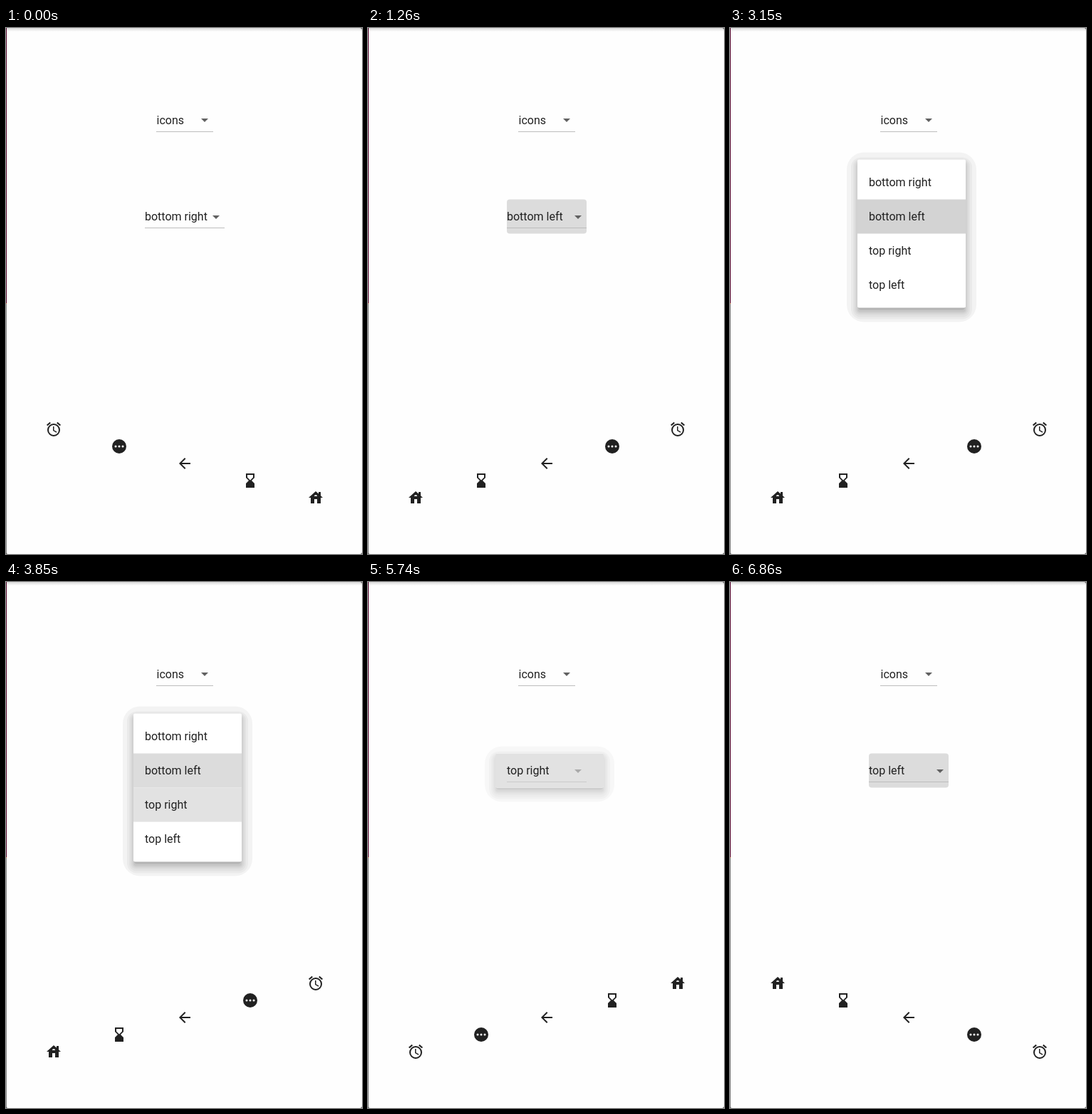
An HTML page for the animation above (8 s loop, 500 by 738 pixels).

```html
<!DOCTYPE html>
<html lang="en">
<head>
<meta charset="utf-8">
<title>Dropdown and icon layout</title>
<style>
  html, body { margin: 0; width: 100%; height: 100%; overflow: hidden; background: #fefefe; }
  svg { display: block; width: 500px; height: 738px; }
  text { font: 16px Roboto, sans-serif; fill: #212121; white-space: pre; }
</style>
</head>
<body>
<svg id="stage" viewBox="0 0 500 738">
  <defs>
    <linearGradient id="topShade" x2="0" y2="1">
      <stop stop-color="#d8d8d8"/><stop offset="1" stop-color="#fefefe"/>
    </linearGradient>
    <clipPath id="menuClip"><rect id="clipBox" x="179" width="152" rx="2"/></clipPath>
  </defs>
  <rect width="500" height="738" fill="#fefefe"/>
  <rect width="500" height="5" fill="url(#topShade)"/>
  <rect width="1" height="386" fill="#5a0a32"/>
  <rect y="386" width="1" height="1" fill="#e08040"/>
  <rect y="387" width="1" height="351" fill="#8a8a8a"/>
  <path d="M497 0h3v3q0-3-3-3zM500 735v3h-3q3 0 3-3zM0 735v3h3q-3 0-3-3z" fill="#555"/>

  <text x="211.5" y="135">icons</text>
  <path d="M274 127h10l-5 5z" fill="#616161"/>
  <rect x="211" y="145" width="80" height="1" fill="#bdbdbd"/>

  <rect id="focus" x="195" y="240.5" width="112" height="48" rx="4" fill="#dcdcdc"/>
  <text id="label" x="195" y="270"></text>
  <path d="M290 263h10l-5 5z" fill="#616161"/>
  <rect x="195" y="280" width="112" height="1" fill="#bdbdbd"/>

  <g id="icons" fill="#212121"></g>
  <g id="menu">
    <g id="shadow"></g>
    <rect id="panel" x="179" width="152" rx="2" fill="#fff"/>
    <g clip-path="url(#menuClip)"><g id="rows"></g></g>
  </g>
</svg>
<script>
const LOOP = 8000, STEP = 70;
const ROW = 48, PAD = 8, BUTTON_TOP = 240.5;
const OPEN_LEAD = 48;   // ms already elapsed when the menu first shows
const OPTIONS = ['bottom right', 'bottom left', 'top right', 'top left'];

// Each session selects the option after the current one.
const SESSIONS = [
  { open: 210, hover: 490, press: 1120, close: 1190 },
  { open: 2870, hover: 3290, press: 3850, close: 3920 },
  { open: 5740, hover: 6160, press: 6650, close: 6790 },
];

// Shadow bands: spread at the sides, top and bottom, corner radius, opacity
const BANDS = [
  [15, 10, 20, 24, .045], [9, 3, 16, 14, .04], [6, 1, 13, 10, .035],
  [4, -1, 10, 8, .035], [2, -3, 8, 6, .04], [0, -5, 6, 4, .05], [-1, -6, 3, 4, .09],
];

const ICONS = [
  'M22 5.72l-4.6-3.86-1.29 1.53 4.6 3.86zM7.88 3.39L6.6 1.86 2 5.71l1.29 1.53zM12.5 8H11v6l4.75 2.85.75-1.23-4-2.37zM12 4a9 9 0 1 0 0 18a9 9 0 0 0 0-18zm0 16a7 7 0 1 1 0-14a7 7 0 0 1 0 14z',
  'M12 2a10 10 0 1 0 0 20a10 10 0 0 0 0-20z' +
    [7, 12, 17].map(x => `M${x} 10.5a1.5 1.5 0 1 1 0 3a1.5 1.5 0 0 1 0-3z`).join(''),
  'M20 11H7.83l5.59-5.59L12 4l-8 8 8 8 1.41-1.41L7.83 13H20z',
  'M18 22l-.01-6L14 12l3.99-4.01L18 2H6v6l4 4-4 3.99V22zM8 7.5V4h8v3.5l-4 4z',
  'M19 9.3V4h-3v2.6L12 3 2 12h3v8h5v-6h4v6h5v-8h3zM10 10c0-1.1.9-2 2-2s2 .9 2 2z',
];

const el = id => document.getElementById(id);
const clamp = v => Math.max(0, Math.min(1, v));
const mix = (a, b, k) => a + (b - a) * k;

function add(parent, tag, attrs) {
  const node = document.createElementNS('http://www.w3.org/2000/svg', tag);
  set(node, attrs);
  return parent.appendChild(node);
}
function set(node, attrs) {
  for (const key in attrs) node.setAttribute(key, attrs[key]);
}

const iconNodes = ICONS.map(d => add(el('icons'), 'path', { d, 'fill-rule': 'evenodd' }));
const bandNodes = BANDS.map(([side, , , rx, opacity]) =>
  add(el('shadow'), 'rect', { x: 179 - side, width: 152 + 2 * side, rx, 'fill-opacity': opacity }));
const rows = OPTIONS.map(name => {
  const group = add(el('rows'), 'g', {});
  const back = add(group, 'rect', { x: 179, width: 152, height: ROW });
  const text = add(group, 'text', { x: 195 });
  text.textContent = name;
  return { group, back, text };
});

function placeIcons(option) {
  const left = option % 2, up = option > 1;
  iconNodes.forEach((node, i) => {
    const x = 55 + 92 * (left ? 4 - i : i);
    const y = 551 + 24 * (up ? 4 - i : i);
    set(node, { transform: `translate(${x} ${y})` });
  });
}

function drawMenu(session, selected, t) {
  const elapsed = t - session.open + OPEN_LEAD;
  const closing = t >= session.close;
  const grow = clamp((elapsed - 75) / 75);
  const fullTop = BUTTON_TOP - PAD - selected * ROW;
  const top = mix(BUTTON_TOP, fullTop, grow);
  const bottom = mix(BUTTON_TOP + ROW, fullTop + OPTIONS.length * ROW + 2 * PAD, grow);
  const box = { y: top, height: bottom - top };

  set(el('menu'), { opacity: closing ? .5 : clamp(elapsed / 75) });
  set(el('panel'), box);
  set(el('clipBox'), box);
  BANDS.forEach(([, above, below], i) =>
    set(bandNodes[i], { y: top - above, height: bottom - top + above + below }));

  const unit = .5 / (OPTIONS.length + 1.5);
  const hovered = t >= session.hover ? selected + 1 : selected;
  rows.forEach(({ group, back, text }, i) => {
    const y = BUTTON_TOP + (i - selected) * ROW;
    const start = .5 + (i + 1) * unit;
    let fill = 'none';
    if (i === selected) fill = hovered === i ? '#d3d3d3' : '#dcdcdc';
    else if (i === hovered) fill = t >= session.press ? '#e2e2e2' : '#ececec';
    set(group, { opacity: i === selected ? 1 : clamp((elapsed / 300 - start) / (1.5 * unit)) });
    set(back, { y, fill });
    set(text, { y: y + 29.5 });
  });
}

function render(time) {
  const t = Math.floor(time % LOOP / STEP) * STEP;
  const option = SESSIONS.filter(s => t >= s.close).length;
  const active = SESSIONS.findIndex(s => t >= s.open && t < s.close + STEP);
  const session = SESSIONS[active];
  const covered = session && t < session.close;

  el('label').textContent = OPTIONS[option];
  set(el('focus'), { visibility: option && !covered ? 'visible' : 'hidden' });
  set(el('menu'), { visibility: session ? 'visible' : 'hidden' });
  placeIcons(option);
  if (session) drawMenu(session, active, t);
}

const begin = performance.now();
function loop() {
  render(performance.now() - begin);
  requestAnimationFrame(loop);
}
loop();
</script>
</body>
</html>
```
